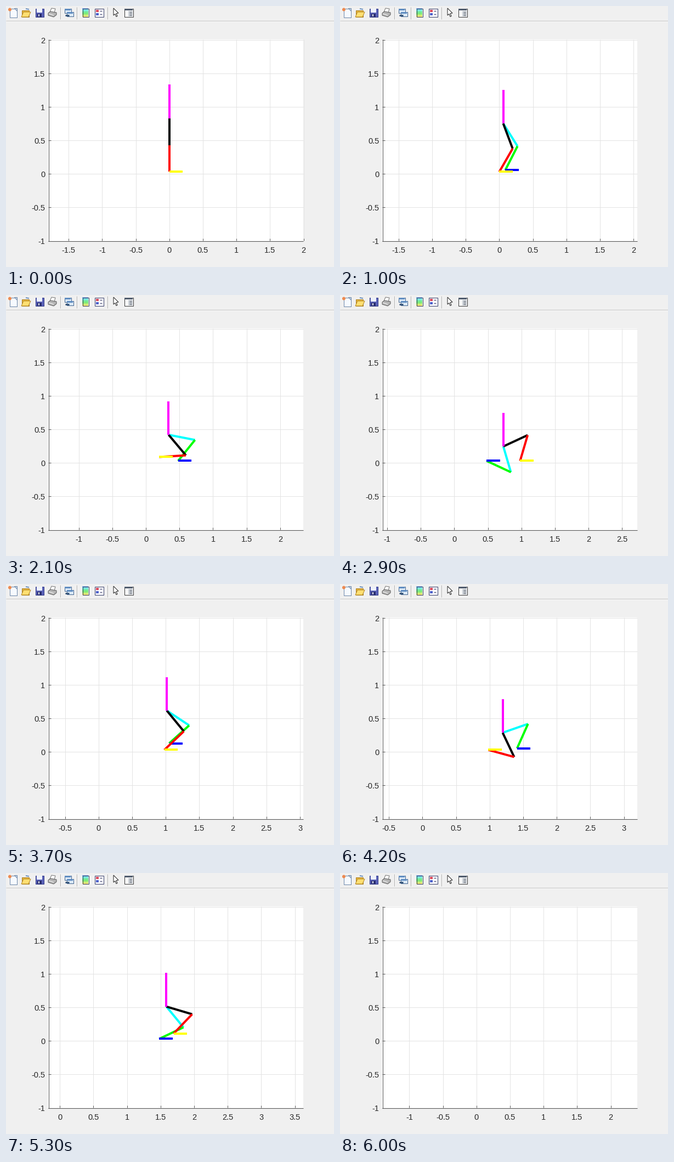
Write a matplotlib script that moves like this. It is 598 px wide and 476 px high and loops after 6100 ms.

```python
import numpy as np
import matplotlib.pyplot as plt
from matplotlib.animation import FuncAnimation
from matplotlib.colors import hsv_to_rgb
from matplotlib.patches import Circle, Polygon, Rectangle

W, H, DPI = 598, 476, 100
FRAMES, STEP_MS = 61, 100
PX = 72 / DPI                       # points per pixel
LEFT, RIGHT, TOP, BOTTOM = 77, 542, 61, 428
UNIT = (BOTTOM - TOP) / 3           # pixels per data unit
LINK, TORSO, FOOT, GROUND = 0.4, 0.5, 0.2, 0.03
STRIDE, STRIDES = 0.5, 4
INK, AXIS, GRID = "#262626", "#555555", "#e3e3e3"

plt.rcParams["font.family"] = "Liberation Sans"
fig = plt.figure(figsize=(W / DPI, H / DPI), dpi=DPI, facecolor="#f0f0f0")
ax = fig.add_axes([0, 0, 1, 1])
ax.axis("off")


def line(xs, ys, color, width=1, z=2):
    return ax.plot(xs, ys, color=color, lw=width * PX, zorder=z,
                   solid_capstyle="butt")[0]


def box(x, y, w, h, face, edge="none"):
    ax.add_patch(Rectangle((x, y), w, h, fc=face, ec=edge, lw=PX, zorder=3))


def poly(points, face, edge="none"):
    ax.add_patch(Polygon(points, fc=face, ec=edge, lw=PX, zorder=3))


def label(x, y, value, ha):
    return ax.text(x, y, f"{value:g}", size=14.5 * PX, color=INK, ha=ha,
                   va="center_baseline", zorder=4)


# ---------- toolbar icons, each placed by its left edge ----------
def new_page(x):
    box(x + 1.5, 4.5, 13, 16, "#f6faff", "#6d87a8")
    poly([(x + 10, 4), (x + 15, 4), (x + 15, 9)], "#c8d8ea", "#6d87a8")
    ax.add_patch(Circle((x + 2, 6.5), 3, fc="#ee8a50", ec="none", zorder=3))


def folder(x):
    box(x + 0.5, 7.5, 13, 12, "#e8b73c", "#a87c20")
    poly([(x, 20), (x + 4, 11), (x + 17, 11), (x + 13, 20)], "#ffdf72", "#b58a28")
    line([x + 8, x + 14], [5, 6], "#4a78b0", 1.5)


def disk(x):
    box(x + 0.5, 4.5, 15, 15, "#5a62b8", "#343c88")
    box(x + 3, 5, 10, 7, "#eef2fb")
    box(x + 4, 14, 8, 6, "#2c3070")
    box(x + 6, 15, 2, 4, "#dfe4f4")


def printer(x):
    poly([(x + 3, 11), (x + 6, 4), (x + 13, 5), (x + 11, 12)], "#fbfbfb", "#777777")
    poly([(x, 13), (x + 4, 10), (x + 15, 12), (x + 15, 16), (x + 10, 20), (x, 17)],
         "#b4b4b4", "#5c5c5c")
    line([x + 1, x + 10], [14, 17], "#efefef", 1.2, 4)


def linked_windows(x):
    for shift in (0, 4):
        box(x + shift + 0.5, 4.5 + 1.5 * shift, 12, 8, "#dbe9f7", "#44658f")
        box(x + shift + 1, 5 + 1.5 * shift, 11, 2.5, "#5f8cc0")
    line([x + 2, x + 9], [17, 17], "#39587c", 3, 4)


def color_bar(x):
    n = 15
    for k in range(n):
        shade = hsv_to_rgb((0.6 - 0.5 * k / n, 0.5, 0.92))
        box(x, 4 + 16 * k / n, 11, 16 / n + 0.1, shade)
    box(x + 0.5, 4.5, 11, 15, "none", "#3c4660")


def legend(x):
    box(x + 0.5, 4.5, 16, 15, "#fafaff", "#39406a")
    for y, color in ((7, "#d8475a"), (13, "#4a5fc8")):
        box(x + 3, y, 5, 4, color)
        line([x + 10, x + 14], [y + 2, y + 2], "#55597a", 1.4, 4)


def pointer(x):
    poly([(x, 4), (x, 17), (x + 3, 14.5), (x + 5, 19.5), (x + 7, 18.5),
          (x + 5, 13.5), (x + 9, 13)], "white", "#222222")


def inspector(x):
    box(x + 0.5, 4.5, 16, 15, "#f7f7f7", "#3c3c3c")
    box(x + 1, 5, 15, 3, "#4e5a6c")
    box(x + 8, 9, 8, 10, "#cdd2d8")
    for y in (11, 14, 17):
        line([x + 9.5, x + 14], [y, y], "#555b66", 1, 4)


def draw_toolbar():
    line([0, W], [26.5, 26.5], "#c4c4c4")
    line([0, W], [27.5, 27.5], "#fafafa")
    for x in (98.5, 128.5, 184.5):
        line([x, x], [2, 24], "#b0b0b0")
        line([x + 1, x + 1], [2, 24], "#fbfbfb")
    icons = [(new_page, 5), (folder, 28), (disk, 53), (printer, 77),
             (linked_windows, 106), (color_bar, 139), (legend, 161),
             (pointer, 196), (inspector, 215)]
    for icon, x in icons:
        icon(x)


# ---------- plot area ----------
def to_y(value):
    return TOP + 0.5 + (2 - value) * UNIT


def draw_axes():
    box(LEFT, TOP, RIGHT - LEFT, BOTTOM - TOP, "white")
    ax.patches[-1].set_zorder(1)
    for value in np.arange(-1, 2.1, 0.5):
        y = to_y(value)
        line([LEFT, RIGHT], [y, y], GRID)
        line([LEFT, LEFT + 5], [y, y], AXIS, 1, 3)
        label(71.5, y + 0.5, value, "right")
    line([LEFT + 0.5] * 2, [TOP, BOTTOM + 1], AXIS, 1, 3)
    line([LEFT, RIGHT], [BOTTOM + 0.5] * 2, AXIS, 1, 3)


# ---------- gait ----------
def gait_phase(ms):
    """Strides completed so far; the pace changes at a few key times."""
    return np.interp(ms, [700, 1500, 2100, 2900, 5700], [0, 0.5, 1.2, 2, STRIDES])


def ankles(phase):
    """Far and near ankle; they take turns, and longer swings rise higher."""
    feet = np.array([[0, GROUND], [0, GROUND]])
    for k in range(STRIDES):
        u = np.clip(phase - k, 0, 1)
        landing = STRIDE * (k + 1) - 0.02
        reach = landing - max(landing - 2 * STRIDE, 0)
        feet[k % 2] += reach * u, 0.1 * reach * np.sin(np.pi * u)
    return feet


def hip_point(phase, feet):
    first = min(phase, 1)
    x = feet[:, 0].mean() + 0.025 * np.sin(np.pi * first)
    y = 0.83 - 0.585 * first ** 1.2
    if phase > 1:
        y += 0.385 * abs(np.sin(np.pi * phase)) ** 1.5
    return np.array([x, y])


def knee_point(hip, foot):
    d = foot - hip
    dist = np.hypot(*d)
    bend = np.sqrt(max(LINK ** 2 - dist ** 2 / 4, 0))
    return hip + d / 2 + bend * np.array([-d[1], d[0]]) / dist


def pose(phase):
    feet = ankles(phase)
    hip = hip_point(phase, feet)
    parts = []
    for foot in feet:
        knee = knee_point(hip, foot)
        parts += [(hip, knee), (knee, foot), (foot, foot + [FOOT, 0])]
    return parts + [(hip, hip + [0, TORSO])]


draw_toolbar()
draw_axes()
COLORS = ["cyan", "lime", "blue", "black", "red", "yellow", "magenta"]
limbs = [line([], [], c, 4, 6 + 0.1 * i) for i, c in enumerate(COLORS)]
ticks = [(v, line([], [], GRID), line([], [], AXIS, 1, 3), label(0, 444.5, v, "center"))
         for v in np.arange(-2, 4.1, 0.5)]
ax.set_xlim(0, W)
ax.set_ylim(H, 0)


def update(i):
    phase = gait_phase(i * STEP_MS)
    cleared = i == FRAMES - 1
    parts = pose(phase)
    # the view runs slightly ahead of the hip in mid-stride
    lead = 0.015 * phase * abs(np.sin(np.pi * phase))
    center = 0.4 if cleared else parts[-1][0][0] + lead

    def to_x(value):
        return LEFT + 0.5 + (value - center + 1.8) * (RIGHT - LEFT) / 3.8

    for value, grid, mark, text in ticks:
        x = to_x(value)
        for part in (grid, mark, text):
            part.set_visible(LEFT <= x <= RIGHT + 1)
        grid.set_data([x, x], [TOP, BOTTOM])
        mark.set_data([x, x], [BOTTOM - 4, BOTTOM])
        text.set_x(x)

    for limb, (a, b) in zip(limbs, parts):
        limb.set_visible(not cleared)
        limb.set_data([to_x(a[0]), to_x(b[0])], [to_y(a[1]), to_y(b[1])])
    return limbs


def to_start():
    return update(0)


anim = FuncAnimation(fig, update, frames=FRAMES, init_func=to_start, interval=STEP_MS,
                     repeat=True, repeat_delay=0, blit=False)
plt.show()
```
